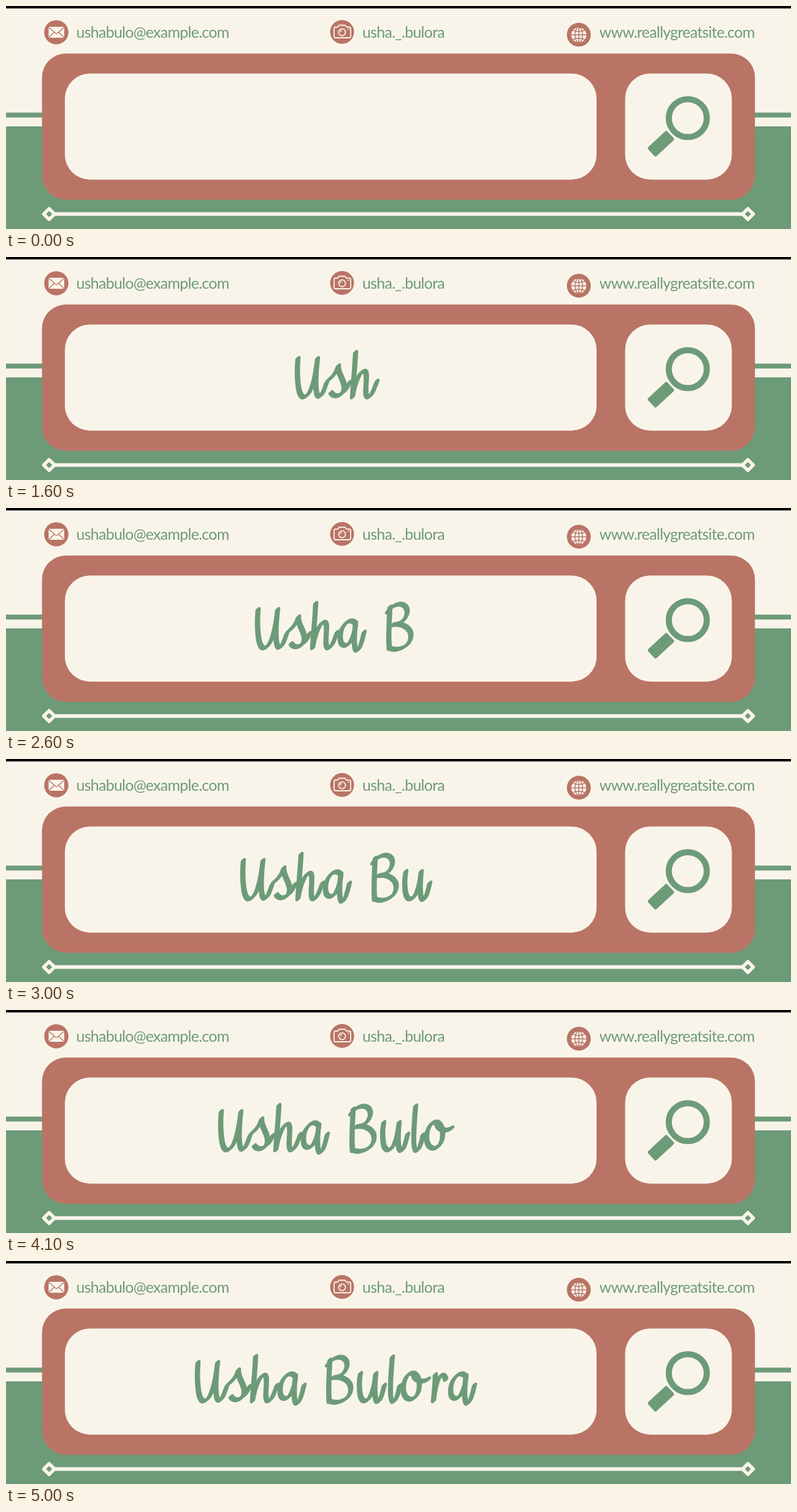
Recreate the animation shown at these times as an HTML page. Size 1280x365 px, loop 6 s.

```html
<!DOCTYPE html>
<html lang="en">
<head>
<meta charset="utf-8">
<title>Search banner</title>
<style>
  html, body { margin: 0; width: 100%; height: 100%; overflow: hidden; background: #f9f4e9; }
  svg { display: block; width: 100%; height: 100%; }
  text { font: 25px Lato, "Open Sans", sans-serif; letter-spacing: -0.03em; fill: #6d9b78; }
  .green { fill: #6d9b78; }
  .clay { fill: #b97465; }
  .cream { fill: #f9f4e9; }
  .line { fill: none; stroke: #f9f4e9; }
  .cut { fill: none; stroke: #b97465; stroke-width: 1.4; }
  .ink path { fill: none; stroke: #6d9b78; stroke-width: 4.6; stroke-linecap: round; stroke-linejoin: round; }
</style>
</head>
<body>
<svg viewBox="0 0 1280 365" xmlns="http://www.w3.org/2000/svg">
  <rect class="cream" width="1280" height="365"/>
  <rect width="1280" height="4"/>
  <rect class="green" y="174.5" width="1280" height="8"/>
  <rect class="green" y="197" width="1280" height="168"/>

  <!-- contact row -->
  <circle class="clay" cx="82" cy="43" r="19.8"/>
  <rect class="cream" x="69.5" y="34" width="25.5" height="18" rx="1.5"/>
  <path class="cut" d="M70 35L80.5 44.2Q82.2 45.6 84 44.2L94.5 35M70 51.5L78.5 43M94.5 51.5L86 43"/>
  <text x="114.5" y="52">ushabulo@example.com</text>

  <circle class="clay" cx="548" cy="42.5" r="19.5"/>
  <path class="line" stroke-width="1.8" stroke-linejoin="round" d="M537.5 34.5H541L543 31.5H553L555 34.5H559.5Q562 34.5 562 37V49.5Q562 52 559.5 52H537.5Q535 52 535 49.5V37Q535 34.5 537.5 34.5Z"/>
  <circle class="line" stroke-width="1.8" cx="548" cy="43" r="5.6"/>
  <path class="line" stroke-width="1.3" d="M545.2 43A2.8 2.8 0 0 1 548 40.2M557 38H559.5"/>
  <text x="581" y="52">usha._.bulora</text>

  <circle class="clay" cx="934" cy="47" r="19.5"/>
  <circle class="cream" cx="934" cy="47.2" r="12.3"/>
  <path class="cut" d="M934 34V60M921 47.2H947M924 39.5Q934 44 944 39.5M924 55Q934 50.5 944 55"/>
  <ellipse class="cut" cx="934" cy="47.2" rx="6.2" ry="12.6"/>
  <text x="967.5" y="52">www.reallygreatsite.com</text>

  <!-- search bar -->
  <rect class="clay" x="58.7" y="77.7" width="1162.5" height="239.5" rx="39"/>
  <rect class="cream" x="96" y="110.5" width="867" height="173.7" rx="41"/>
  <rect class="cream" x="1009.5" y="110.5" width="174" height="173.7" rx="41"/>
  <circle cx="1111.7" cy="183.5" r="31" fill="none" stroke="#6d9b78" stroke-width="10"/>
  <path class="green" stroke="#6d9b78" stroke-width="5" stroke-linejoin="round" d="M1076.5 207L1087 218L1059 243.8L1048.8 232.8Z"/>

  <!-- divider -->
  <path class="line" stroke-width="6" d="M79 340.5H1201"/>
  <path class="line" stroke-width="5.4" stroke-linejoin="round" d="M70.3 331.7l8.8 8.8l-8.8 8.8l-8.8 -8.8zM1209.7 331.7l8.8 8.8l-8.8 8.8l-8.8 -8.8z"/>

  <g id="word" class="ink" role="img" aria-label="Usha Bulora"></g>
</svg>
<script>
const LOOP = 6000, STEP = 500, CENTER = 538;
const NIB = { x: 4, y: -3.5, copies: 5 };

// Pen path and advance of each letter; y is in stage units.
const glyphs = {
  U: [50, "M5 166C3 190 4 231 15 229C27 227 34 195 37 166C34 190 32 227 39 228C45 228 48 216 52 205"],
  s: [38, "M4 202C12 196 18 188 21 178C19 192 33 203 30 216C27 229 14 230 9 222M27 222C33 220 36 213 39 205"],
  h: [46, "M11 156C10 180 7 208 6 229C9 210 18 184 26 187C33 190 23 227 31 229C37 230 42 214 46 203"],
  a: [48, "M29 188C19 177 5 195 5 212C5 228 17 229 23 216C27 208 30 198 30 188C28 204 26 233 32 233C37 233 41 216 44 203"],
  B: [53, "M9 162C8 186 6 210 8 230M5 170C18 151 39 155 37 172C34 186 24 190 14 191C32 188 45 198 43 212C41 228 20 235 8 229"],
  u: [48, "M6 184C3 200 3 229 13 229C23 229 29 204 31 184C29 204 28 230 34 230C39 230 42 215 45 203"],
  l: [24, "M10 157C8 180 4 229 11 230C16 230 20 215 22 204"],
  o: [48, "M22 184C10 180 3 198 4 212C6 231 24 231 29 212C32 198 28 186 20 184C22 196 34 200 45 193"],
  r: [28, "M8 186C8 200 6 216 5 229C7 210 12 190 18 187C22 186 24 189 25 194"],
  " ": [29, ""]
};

const word = document.getElementById("word");
const make = (name, attrs, parent) => {
  const el = document.createElementNS("http://www.w3.org/2000/svg", name);
  for (const key in attrs) el.setAttribute(key, attrs[key]);
  return parent.appendChild(el);
};

// Repeating a path along a slanted nib gives thick down strokes and thin up strokes.
const letters = [];
let pen = 0;
for (const char of "Usha Bulora") {
  const [advance, d] = glyphs[char];
  if (d) {
    const group = make("g", { transform: `translate(${pen} 0)` }, word);
    for (let i = 0; i < NIB.copies; i++) {
      const k = i / (NIB.copies - 1) - 0.5;
      make("path", { d, transform: `translate(${NIB.x * k} ${NIB.y * k})` }, group);
    }
    letters.push({ group, end: pen + advance });
  }
  pen += advance;
}

function draw(t) {
  const count = Math.min(letters.length, Math.floor(t / STEP));
  letters.forEach((letter, i) => letter.group.setAttribute("display", i < count ? "inline" : "none"));
  const width = count ? letters[count - 1].end : 0;
  word.setAttribute("transform", `translate(${CENTER - width / 2} 0)`);
}

const start = performance.now();
function tick() {
  draw((performance.now() - start) % LOOP);
  requestAnimationFrame(tick);
}
tick();
</script>
</body>
</html>
```
